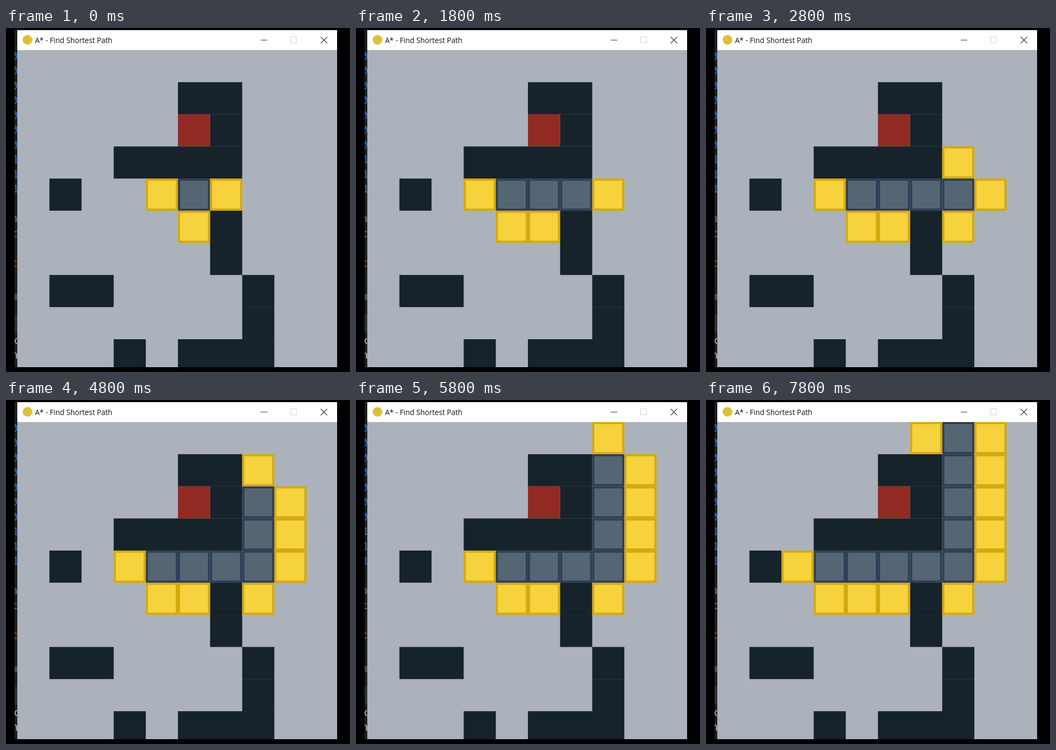
Recreate the animation shown at these times as an HTML page. Size 640 by 640 pixels, loop 8 s.

```html
<!DOCTYPE html>
<html lang="en">
<head>
<meta charset="utf-8">
<title>A* - Find Shortest Path</title>
<style>
  html, body { margin: 0; width: 100%; height: 100%; overflow: hidden; background: #000; }
  svg { display: block; width: 100%; height: 100%; }
  .title { font: 13.6px "Open Sans", sans-serif; fill: #111; }
  .code { font: 20px "Noto Sans Mono", monospace; text-anchor: end; }
  .icon { fill: none; stroke: #333; stroke-width: 1.1; }
  .wall { fill: #17232b; }
  .goal { fill: #922b23; }
  .open { fill: #f6d23d; stroke: #d5aa0d; }
  .closed { fill: #566573; stroke: #2e3e55; }
</style>
</head>
<body>
<svg viewBox="0 0 640 640">
  <defs>
    <clipPath id="strip"><rect x="16" y="4" width="5" height="627"/></clipPath>
    <clipPath id="board"><rect x="21" y="41" width="595" height="590"/></clipPath>
  </defs>
  <rect width="640" height="640" fill="#000"/>
  <g clip-path="url(#strip)">
    <rect x="16" y="4" width="5" height="627" fill="#1f1f20"/>
    <rect x="16" y="495" width="5" height="11" fill="#4a4a4c"/>
    <rect x="16" y="533" width="5" height="34" fill="#303032"/>
    <g id="code" class="code"></g>
  </g>
  <rect x="21" y="4" width="595" height="37" fill="#fffffd"/>
  <circle cx="40" cy="22" r="9" fill="#dcc03a"/>
  <text class="title" x="54" y="28">A* - Find Shortest Path</text>
  <path class="icon" d="M474 22.5H486M585.5 16.5l12 12m0-12l-12 12"/>
  <rect class="icon" x="529.5" y="16.5" width="11" height="11" style="stroke:#d4d4d2"/>
  <rect x="21" y="41" width="595" height="590" fill="#abb2bb"/>
  <g clip-path="url(#board)">
    <g id="map"></g>
    <g id="search"></g>
  </g>
</svg>
<script>
const SIZE = 59.78, LEFT = 21, TOP = 41, EDGE = 4;
const PERIOD = 8000, STEP = 1000, LEAD = 200;

const grid = [
  "..........",
  ".....##...",
  ".....G#...",
  "...####...",
  ".#........",
  "......#...",
  "......#...",
  ".##....#..",
  ".......#..",
  "...#.###.."
];

// Cells in the order the search expands them, as [column, row]
const visits = [[5, 4], [6, 4], [4, 4], [7, 4], [7, 3], [7, 2], [7, 1], [3, 4], [7, 0]];

const $ = id => document.getElementById(id);

function cell(x, y, kind, edge = 0) {
  const side = SIZE - edge;
  return `<rect class="${kind}" x="${LEFT + x * SIZE + edge / 2}" y="${TOP + y * SIZE + edge / 2}"
    width="${side}" height="${side}" stroke-width="${edge}"/>`;
}

// Adjacent walls merge into one bar per row, which avoids seams
function drawMap() {
  let out = "";
  grid.forEach((row, y) => {
    for (const run of row.matchAll(/#+/g)) {
      out += `<rect class="wall" x="${LEFT + run.index * SIZE}" y="${TOP + y * SIZE}"
        width="${run[0].length * SIZE}" height="${SIZE + (y < 9 && grid[y + 1][run.index + run[0].length - 1] === "#" ? 0.2 : 0)}"/>`;
    }
    const goal = row.indexOf("G");
    if (goal >= 0) out += cell(goal, y, "goal");
  });
  $("map").innerHTML = out;
}

function drawSearch(step) {
  const state = new Map();
  for (const [x, y] of visits.slice(0, step + 1)) {
    state.set(x + "," + y, "closed");
    for (const [dx, dy] of [[1, 0], [-1, 0], [0, 1], [0, -1]]) {
      const key = (x + dx) + "," + (y + dy);
      if (grid[y + dy]?.[x + dx] === "." && !state.has(key)) state.set(key, "open");
    }
  }
  $("search").innerHTML = [...state]
    .map(([key, kind]) => cell(...key.split(",").map(Number), kind, EDGE)).join("");
}

function drawCode() {
  const glyph = (ch, y, color, x = 22) => `<text x="${x}" y="${y}" fill="${color}">${ch}</text>`;
  let out = "";
  for (let i = 0; i < 10; i++) {
    out += glyph(i < 7 ? 0 : 1, 59 + i * 27.45, "#2f74d0", i < 7 ? 22 : 24);
  }
  out += glyph("a", 361, "#77787a") + glyph("t", 389, "#77787a") + glyph("t", 444, "#c4502c");
  out += glyph("x", 588, "#c8c8c8") + glyph("n", 615, "#c8c8c8");
  $("code").innerHTML = out;
}

let shown = -1;
function tick() {
  const step = Math.floor((performance.now() % PERIOD + LEAD) / STEP);
  if (step !== shown) drawSearch(shown = step);
  requestAnimationFrame(tick);
}

drawMap();
drawCode();
tick();
</script>
</body>
</html>
```
